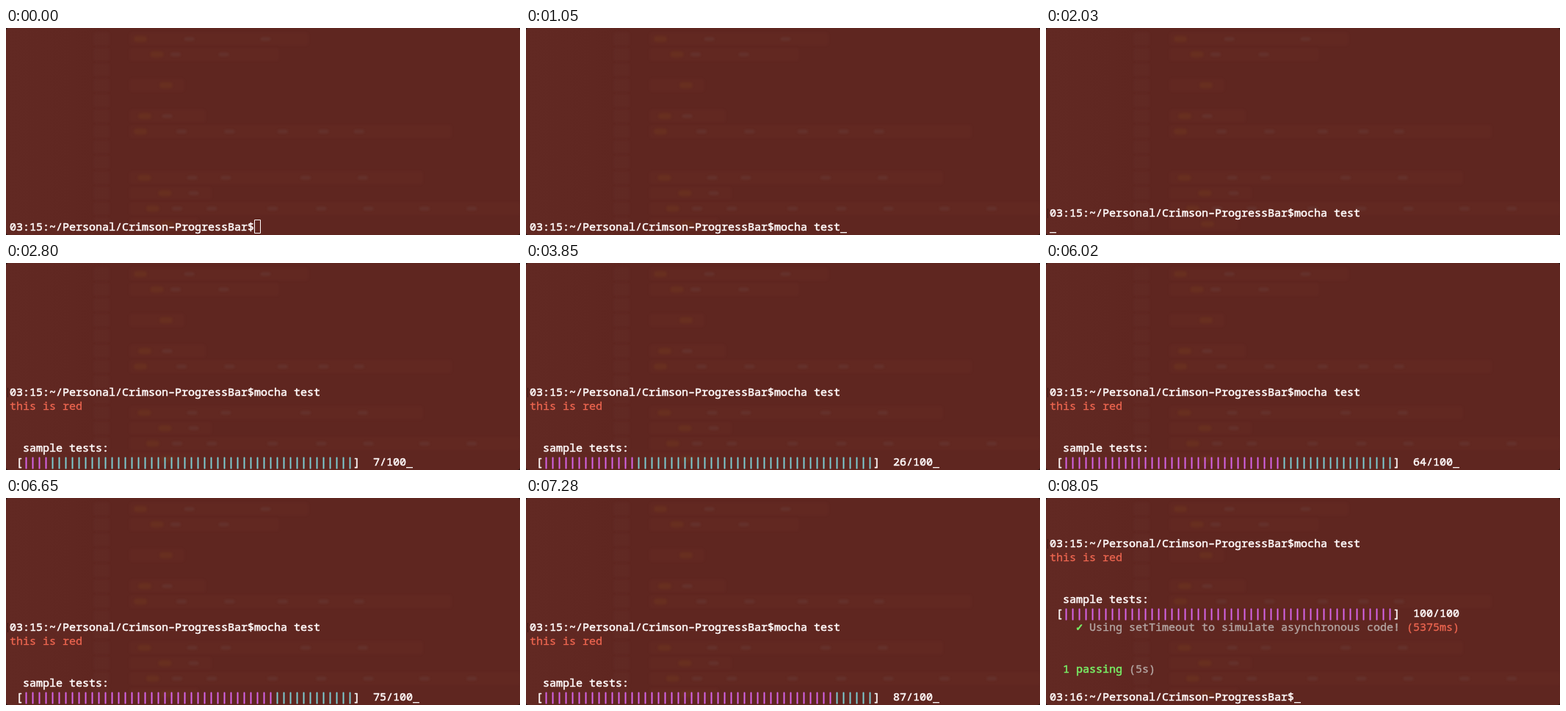
Animation of 700x282 px, one loop 8.12 s. Source, as an HTML page with a canvas:

```html
<!DOCTYPE html>
<html lang="en">
<head>
<meta charset="utf-8">
<title>Terminal progress bar</title>
<style>
html, body { margin: 0; width: 100%; height: 100%; overflow: hidden; background: #5f2620; }
canvas { display: block; width: 700px; height: 282px; }
</style>
</head>
<body>
<canvas id="stage" width="700" height="282"></canvas>
<script>
const ctx = document.getElementById('stage').getContext('2d');
const LOOP = 8120, STEP = 70;
const CELL = 9, LINE = 19, LEFT = 5, BASE = 276;
const WHITE = '#fffafa', RED = '#ee6650', MAGENTA = '#d765ea', CYAN = '#7dcdd2',
      GREEN = '#78ee66', GREY = '#b3a5a2';
const DIR = ':~/Personal/Crimson–ProgressBar$';

function seeded(seed) {
  return () => (seed = seed * 16807 % 2147483647) / 2147483647;
}

// Blurred editor that shows faintly through the window.
function makeBackdrop() {
  const layer = document.createElement('canvas');
  layer.width = 700;
  layer.height = 282;
  const g = layer.getContext('2d');
  const shade = g.createLinearGradient(0, 0, 140, 0);
  shade.addColorStop(0, '#622923');
  shade.addColorStop(1, '#5f2620');
  g.fillStyle = '#24100e';
  g.fillRect(0, 0, 700, 282);
  g.fillStyle = shade;
  g.beginPath();
  g.roundRect(0, 0, 700, 282, 4);
  g.fill();

  const smudge = (x, y, w, h, color) => {
    g.fillStyle = color;
    g.beginPath();
    g.roundRect(x, y - h / 2, w, h, 4);
    g.fill();
  };
  const random = seeded(29);
  const lineEnds = [412, 372, 0, 243, 0, 272, 607, 0, 0, 568, 280, 700, 262];
  g.filter = 'blur(1.5px)';
  lineEnds.forEach((end, row) => {
    const y = 15 + row * 21;
    smudge(119, y, 22, 19, 'rgba(120,65,65,.1)');
    if (!end) return;
    smudge(168, y, end - 168, 18, 'rgba(125,65,50,.1)');
    smudge(174 + random() * 50, y, 18, 8, 'rgba(125,68,28,.25)');
    for (let x = 210 + random() * 40; x < end - 30; x += 40 + random() * 70) {
      smudge(x, y, 14, 5, 'rgba(115,88,90,.2)');
    }
  });
  return layer;
}
const backdrop = makeBackdrop();

const xOf = col => LEFT + col * CELL;

// Rows count upwards from the bottom line; the outline gives a medium weight.
function write(row, col, text, color = WHITE, weight = 0.55) {
  const x = xOf(col), y = BASE - row * LINE;
  ctx.fillStyle = ctx.strokeStyle = color;
  ctx.lineWidth = weight;
  ctx.fillText(text, x, y);
  ctx.strokeText(text, x, y);
}

function underscore(col) {
  ctx.fillStyle = WHITE;
  ctx.fillRect(xOf(col), 278, CELL, 1.3);
}

function command(row, typed) {
  write(row, 0, '03:15' + DIR + typed);
}

function promptMark(row) {
  ctx.fillStyle = '#3d1714';
  ctx.fillRect(2, BASE - row * LINE - 11, 1, 13);
}

function progress(row, count) {
  const filled = Math.min(50, Math.floor(count / 2) + 1);
  write(row, 1, '[');
  write(row, 2, '|'.repeat(filled), MAGENTA, 0.8);
  write(row, 2 + filled, '|'.repeat(50 - filled), CYAN, 0.8);
  write(row, 52, ']');
  write(row, 55, count + '/100');
}

function testRun(bottom, count) {
  promptMark(bottom + 5);
  command(bottom + 5, 'mocha test');
  write(bottom + 4, 0, 'this is red', RED, 0.3);
  write(bottom + 1, 2, 'sample tests:');
  progress(bottom, count);
}

function typing(time) {
  const typed = time < 840 ? '' : time < 1050 ? 'mocha' : 'mocha test';
  command(0, typed);
  if (time < 210) {
    ctx.strokeStyle = WHITE;
    ctx.lineWidth = 1;
    ctx.strokeRect(338.5, 261.5, 8, 18);
  } else {
    underscore(37 + typed.length);
  }
}

function summary() {
  testRun(6, 100);
  write(5, 4, '✓', GREEN, 0.9);
  write(5, 6, 'Using setTimeout to simulate asynchronous code!', GREY, 0.4);
  write(5, 54, '(5375ms)', RED, 0.3);
  write(2, 2, '1 passing', GREEN);
  write(2, 12, '(5s)', GREY, 0.4);
  write(0, 0, '03:16' + DIR);
  underscore(37);
}

function draw(time) {
  ctx.drawImage(backdrop, 0, 0);
  ctx.font = '500 15px "Noto Sans Mono", "DejaVu Sans Mono", monospace';
  ctx.lineJoin = 'round';
  if (time < 2030) {
    typing(time);
  } else if (time < 2380) {
    promptMark(1);
    command(1, 'mocha test');
    underscore(0);
  } else if (time < 8050) {
    const count = Math.floor(0.25 + 1.24 * (time - 2380) / STEP);
    testRun(0, count);
    underscore(55 + (count + '/100').length);
  } else {
    summary();
  }
}

const start = performance.now();
function tick() {
  const time = (performance.now() - start) % LOOP;
  draw(Math.floor(time / STEP) * STEP);
  requestAnimationFrame(tick);
}
tick();
</script>
</body>
</html>
```
